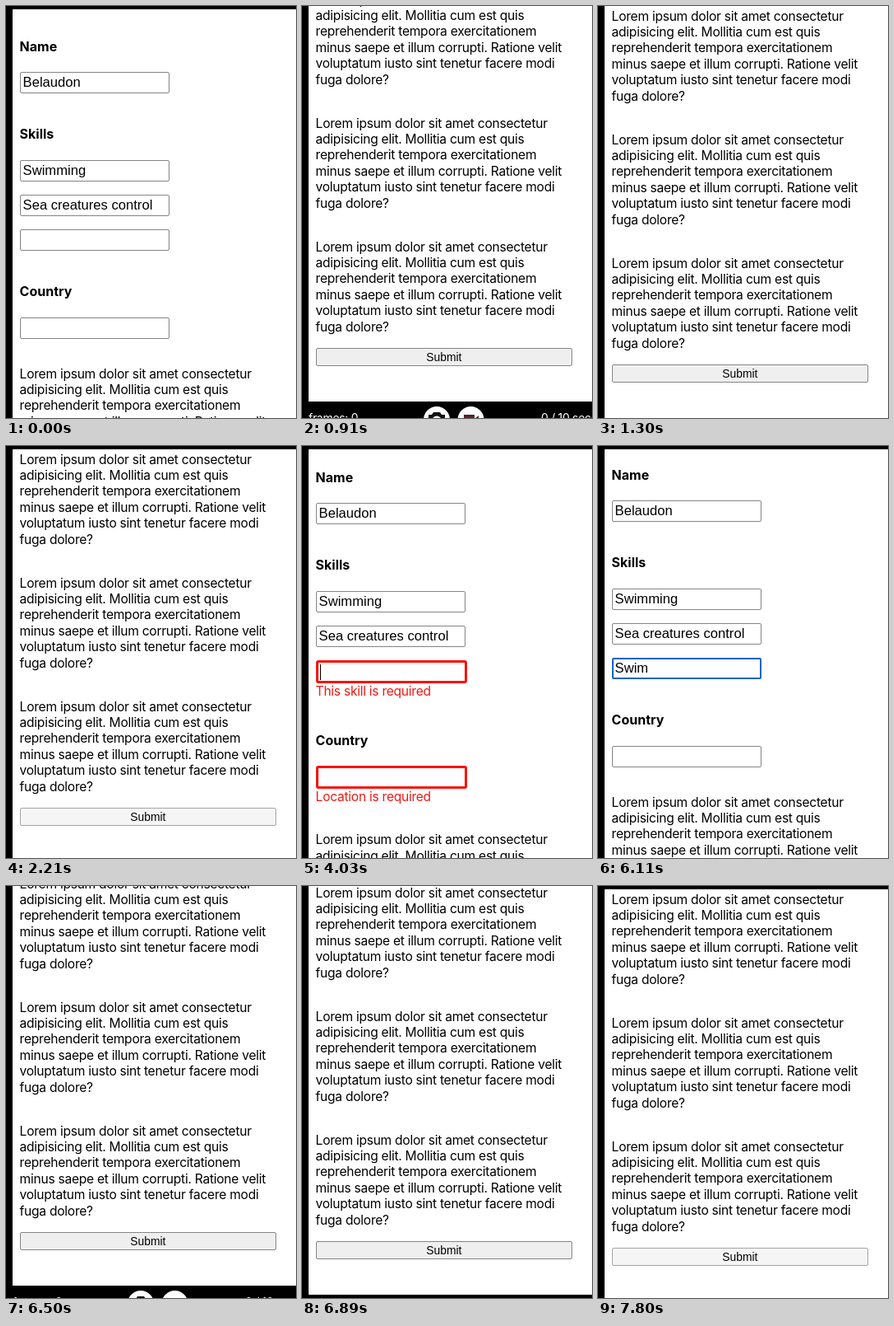
Write an HTML page that moves like this. It is 353 px wide and 500 px high and loops after 8000 ms.

```html
<!DOCTYPE html>
<html lang="en">
<head>
<meta charset="utf-8">
<title>Form validation</title>
<style>
  html, body { margin: 0; width: 100%; height: 100%; overflow: hidden; background: #000; }
  #stage { position: relative; width: 353px; height: 500px; overflow: hidden; background: #000; }
  #screen { position: absolute; left: 0; top: 0; width: 353px; height: 560px; }
  #page { position: absolute; left: 8px; top: 4px; width: 345px; height: 500px; overflow: hidden; background: #fff; }
  #doc {
    position: absolute; left: 8.6px; top: 35px; width: 312.5px;
    font: 15.6px/19.45px Inter, sans-serif; letter-spacing: -.27px; color: #000; white-space: nowrap;
  }
  h4 { margin: 0 0 21.2px; height: 20px; font: 700 16px/20px Inter, sans-serif; letter-spacing: 0; }
  section { margin-bottom: 39.3px; }
  section:last-of-type { margin-bottom: 33px; }
  .field {
    display: flex; align-items: center; box-sizing: border-box; width: 182.5px; height: 26px;
    padding-left: 3px; border: 1px solid #858585; border-radius: 2px; background: #fff;
    font: 16.6px/20px "Liberation Sans", Arial, sans-serif; letter-spacing: 0;
  }
  .row + .row { margin-top: 16.2px; }
  .focus .field { border: 2px solid #1463c6; padding-left: 2px; }
  .bad .field { width: 184.5px; height: 28px; border: 3px solid #f8120c; border-radius: 3px; padding-left: 2px; }
  .error { display: none; color: #f01a14; }
  .bad .error { display: block; }
  #caret { width: 1px; height: 19px; background: #000; }
  p { margin: 0 0 33.3px; }
  p:last-of-type { margin-bottom: 15.5px; }
  #submit {
    box-sizing: border-box; height: 22px; border: 1px solid; border-radius: 2px; text-align: center;
    font: 13.85px/20px "Liberation Sans", Arial, sans-serif; letter-spacing: 0;
  }
  #bar { position: absolute; left: 0; top: 504px; }
  #bar text { font: 14px Inter, sans-serif; letter-spacing: -.3px; fill: #fff; }
</style>
</head>
<body>
<div id="stage">
  <div id="screen">
    <div id="page"><div id="doc"></div></div>
    <svg id="bar" width="353" height="56">
      <text x="8" y="25">frames: 0</text>
      <text x="291" y="25">0 / 10 secs</text>
      <circle cx="164" cy="22" r="16" fill="#fff"/>
      <circle cx="205.5" cy="22" r="16" fill="#fff"/>
      <path d="M154 16h4l2-3h8l2 3h4v15h-20z" fill="#111"/>
      <circle cx="164" cy="23" r="5.5" fill="#fff"/>
      <circle cx="164" cy="23" r="3" fill="#111"/>
      <path d="M197 16h13v5l5-4v13l-5-4v5h-13z" fill="#5c1f28"/>
    </svg>
  </div>
</div>
<script>
const LOOP = 8000;
const LOREM = [
  'Lorem ipsum dolor sit amet consectetur',
  'adipisicing elit. Mollitia cum est quis',
  'reprehenderit tempora exercitationem',
  'minus saepe et illum corrupti. Ratione velit',
  'voluptatum iusto sint tenetur facere modi',
  'fuga dolore?'
].join('<br>');
const BUTTON = {
  rest: ['#efefef', '#858585'],
  hover: ['#e9e9e9', '#787878'],
  down: ['#f5f5f5', '#a4a4a4']
};
const END = 580;

const row = (text, id = '', error = '') =>
  `<div class="row" id="${id}"><div class="field">${text}</div><div class="error">${error}</div></div>`;
const section = (title, ...rows) => `<section><h4>${title}</h4>${rows.join('')}</section>`;
const $ = id => document.getElementById(id);

$('doc').innerHTML =
  section('Name', row('Belaudon')) +
  section('Skills', row('Swimming'), row('Sea creatures control'),
    row('<span id="typed"></span><i id="caret"></i>', 'skill', 'This skill is required')) +
  section('Country', row('', 'country', 'Location is required')) +
  `<p>${LOREM}</p>`.repeat(4) +
  '<div id="submit">Submit</div>';

// Each step changes only the listed values; the rest carry over.
const START = { scroll: 0, bounce: 0, errors: false, focus: false, caret: false, typed: '', button: 'rest' };
const STEPS = [
  [650, { scroll: 70 }],
  [780, { scroll: 390 }],
  [910, { scroll: END, bounce: 24 }],
  [1040, { bounce: 20 }],
  [1170, { bounce: 11 }],
  [1300, { bounce: 4 }],
  [1430, { bounce: 0, button: 'hover' }],
  [2210, { button: 'down' }],
  [2340, { button: 'hover' }],
  [2860, { scroll: 11, errors: true, focus: true, button: 'rest' }],
  [2990, { caret: true }],
  [3510, { caret: false }],
  [4030, { caret: true }],
  [4550, { typed: 'S', errors: false }],
  [4810, { typed: 'Sw' }],
  [5070, { typed: 'Swi' }],
  [5200, { typed: 'Swim' }],
  [5720, { caret: false }],
  [6110, { scroll: 14 }],
  [6240, { scroll: 150 }],
  [6370, { scroll: 440 }],
  [6500, { scroll: END, bounce: 19 }],
  [6630, { bounce: 22 }],
  [6760, { bounce: 14 }],
  [6890, { bounce: 8 }],
  [7020, { bounce: 4 }],
  [7150, { bounce: 2 }],
  [7280, { bounce: 0 }],
  [7540, { button: 'hover' }],
  [7800, { button: 'down' }]
];

function stateAt(t) {
  const state = { ...START };
  for (const [time, change] of STEPS) if (time <= t) Object.assign(state, change);
  return state;
}

function draw(s) {
  $('screen').style.transform = `translateY(${-s.bounce}px)`;
  $('doc').style.transform = `translateY(${-s.scroll}px)`;
  $('skill').classList.toggle('bad', s.errors);
  $('country').classList.toggle('bad', s.errors);
  $('skill').classList.toggle('focus', s.focus && !s.errors);
  $('typed').textContent = s.typed;
  $('caret').style.opacity = s.caret ? 1 : 0;
  const [fill, line] = BUTTON[s.button];
  $('submit').style.background = fill;
  $('submit').style.borderColor = line;
}

const begin = performance.now();
function tick() {
  draw(stateAt((performance.now() - begin) % LOOP));
  requestAnimationFrame(tick);
}
tick();
</script>
</body>
</html>
```
